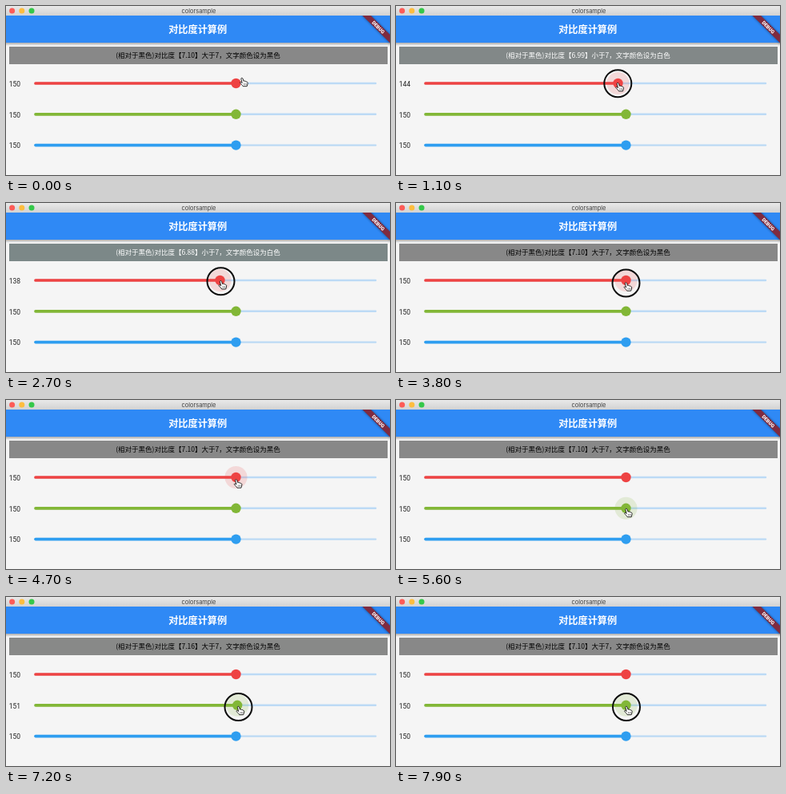
Animation, 480 px wide and 212 px high, one loop 8 s. Source, as an HTML page:

```html
<!DOCTYPE html>
<html lang="zh-CN">
<head>
<meta charset="utf-8">
<title>对比度计算例</title>
<style>
  html, body { margin: 0; width: 100%; height: 100%; overflow: hidden; background: #f5f5f5; }
  svg { display: block; width: 480px; height: 212px; }
  text { font-family: Roboto, "Noto Sans CJK SC", "Noto Sans CJK", sans-serif; font-size: 8.5px; }
  .mid { text-anchor: middle; }
  .window { font-family: Inter, sans-serif; font-size: 7.4px; fill: #404040; }
  .heading { font-size: 12.2px; font-weight: 700; fill: #fff; }
  .debug { font-size: 6.1px; font-weight: 900; fill: #fff; }
  #message { font-family: "Noto Sans CJK SC", "Noto Sans CJK", sans-serif; font-weight: 500; }
</style>
</head>
<body>
<svg viewBox="0 0 480 212">
  <defs>
    <linearGradient id="chrome" x2="0" y2="1">
      <stop stop-color="#e9e9e9"/><stop offset="1" stop-color="#d2d2d2"/>
    </linearGradient>
    <linearGradient id="shade" x2="0" y2="1">
      <stop stop-opacity=".3"/><stop offset="1" stop-opacity="0"/>
    </linearGradient>
    <filter id="soft" x="-20%" y="-80%" width="140%" height="260%"><feGaussianBlur stdDeviation="1.5"/></filter>
    <clipPath id="app"><rect y="12" width="480" height="200"/></clipPath>
  </defs>
  <rect width="480" height="212" fill="#f5f5f5"/>
  <rect y="46" width="480" height="4" fill="url(#shade)"/>
  <rect y="12" width="480" height="34" fill="#2f89f5"/>
  <rect width="480" height="12" fill="url(#chrome)"/>
  <circle cx="7.6" cy="6" r="3.5" fill="#fc5b57"/>
  <circle cx="19.8" cy="6" r="3.5" fill="#fdbd3f"/>
  <circle cx="32" cy="6" r="3.5" fill="#35c84a"/>
  <text class="mid window" x="241" y="8.8">colorsample</text>
  <text class="mid heading" x="239.7" y="33.5">对比度计算例</text>
  <g clip-path="url(#app)">
    <g transform="translate(480 12) rotate(45)">
      <rect x="-25" y="17" width="50" height="7.3" opacity=".5" filter="url(#soft)"/>
      <rect x="-25" y="17" width="50" height="7.3" fill="#7f2b40"/>
      <text class="mid debug" y="22.9">DEBUG</text>
    </g>
  </g>
  <rect id="swatch" x="4" y="51" width="473" height="22"/>
  <text id="message" class="mid" x="240" y="65.1"></text>
  <g id="sliders"></g>
  <circle id="ring" r="17" fill="none" stroke="#0c0c0c" stroke-width="2"/>
  <g id="cursor">
    <path d="M-1.2 .2C-1.2-.9.6-1 1 0L2 3.2C3 2.6 3.9 3 4 3.6 4.9 3.2 5.6 3.6 5.8 4.3 6.7 4.1 7.2 4.8 7.2 5.6 7.2 7.3 6.4 8.3 6.2 9.7H1.2C.6 8.3-1 7.2-2.2 5.7-2.9 4.8-1.8 4-.9 4.7L.2 5.5Z"
      fill="#fff" stroke="#111" stroke-width=".9" stroke-linejoin="round"/>
    <path d="M2.4 6.1v2.1M3.9 6.1v2.1M5.3 6.1v2.1" stroke="#222" stroke-width=".5"/>
  </g>
</svg>
<script>
const LOOP = 8000, STEP = 100, LEFT = 37, RIGHT = 462;
const byId = id => document.getElementById(id);

const redValue = [[700, 150], [1100, 144], [1900, 132], [2700, 138], [3300, 147], [3800, 150]];
const greenValue = [[5700, 150], [6200, 140], [6600, 148], [7300, 152], [7800, 150]];
const redHover = [[100, 0], [300, 1], [4800, 1], [5000, 0]];
const greenHover = [[5000, 0], [5300, 1]];
const pointerX = [[100, 295], [300, 287.5], [700, 287.5], [1100, 277.3], [1900, 257.5], [2700, 268.5],
  [3300, 283], [3800, 287.5], [5700, 288], [6200, 271], [6600, 284.5], [7300, 291.5], [7800, 288]];
const pointerY = [[100, 91], [300, 97], [1900, 97.3], [2700, 98.3], [3300, 101.5], [3800, 100.5],
  [4700, 100.5], [5400, 137], [5700, 137], [6200, 138]];

const sliders = [
  { y: 97, color: "#ee4343", value: redValue, hover: redHover },
  { y: 135.8, color: "#82b737", value: greenValue, hover: greenHover },
  { y: 174.6, color: "#2f9ef0", value: [[0, 150]], hover: [[0, 0]] }
];

// Linear interpolation over [time, value] keys, held at both ends.
function at(keys, t) {
  const i = keys.findIndex(key => key[0] > t);
  if (i < 0) return keys[keys.length - 1][1];
  if (i === 0) return keys[0][1];
  const [t0, a] = keys[i - 1], [t1, b] = keys[i];
  return a + (b - a) * (t - t0) / (t1 - t0);
}

function add(name, attrs) {
  const node = document.createElementNS("http://www.w3.org/2000/svg", name);
  set(node, attrs);
  return byId("sliders").appendChild(node);
}

function set(node, attrs) {
  for (const key in attrs) node.setAttribute(key, attrs[key]);
}

for (const s of sliders) {
  const line = { x1: LEFT, y1: s.y, y2: s.y, "stroke-linecap": "round" };
  s.label = add("text", { x: 3.8, y: s.y + 3.7, fill: "#222" });
  add("line", { ...line, x2: RIGHT, stroke: "#bcdaf5", "stroke-width": 2.4 });
  s.active = add("line", { ...line, stroke: s.color, "stroke-width": 3.7 });
  s.halo = add("circle", { cy: s.y, fill: s.color });
  s.thumb = add("circle", { cy: s.y, r: 6.2, fill: s.color });
}

function linear(channel) {
  const c = channel / 255;
  return c <= 0.03928 ? c / 12.92 : ((c + 0.055) / 1.055) ** 2.4;
}

function contrastWithBlack([r, g, b]) {
  return (0.2126 * linear(r) + 0.7152 * linear(g) + 0.0722 * linear(b) + 0.05) / 0.05;
}

function render(t) {
  const rgb = sliders.map(s => Math.round(at(s.value, t)));
  sliders.forEach((s, i) => {
    const x = LEFT + (RIGHT - LEFT) * rgb[i] / 255 + 0.5;
    const hover = at(s.hover, t);
    s.label.textContent = rgb[i];
    set(s.active, { x2: x });
    set(s.thumb, { cx: x });
    set(s.halo, { cx: x, r: 14 * hover, opacity: 0.16 * hover });
  });

  const contrast = contrastWithBlack(rgb);
  const dark = contrast > 7;
  const [size, tone] = dark ? ["大", "黑"] : ["小", "白"];
  byId("message").textContent =
    `(相对于黑色)对比度【${contrast.toFixed(2)}】${size}于7，文字颜色设为${tone}色`;
  set(byId("message"), { fill: dark ? "#000" : "#fff" });
  set(byId("swatch"), { fill: `rgb(${rgb.map(v => v - 14)})` });

  const place = `translate(${at(pointerX, t)} ${at(pointerY, t)})`;
  const pressed = (t >= 700 && t < 4400) || t >= 5700;
  set(byId("cursor"), { transform: place });
  set(byId("ring"), { transform: place, visibility: pressed ? "visible" : "hidden" });
}

const start = performance.now();
function tick() {
  const t = (performance.now() - start) % LOOP;
  render(Math.floor(t / STEP) * STEP);
  requestAnimationFrame(tick);
}
tick();
</script>
</body>
</html>
```
